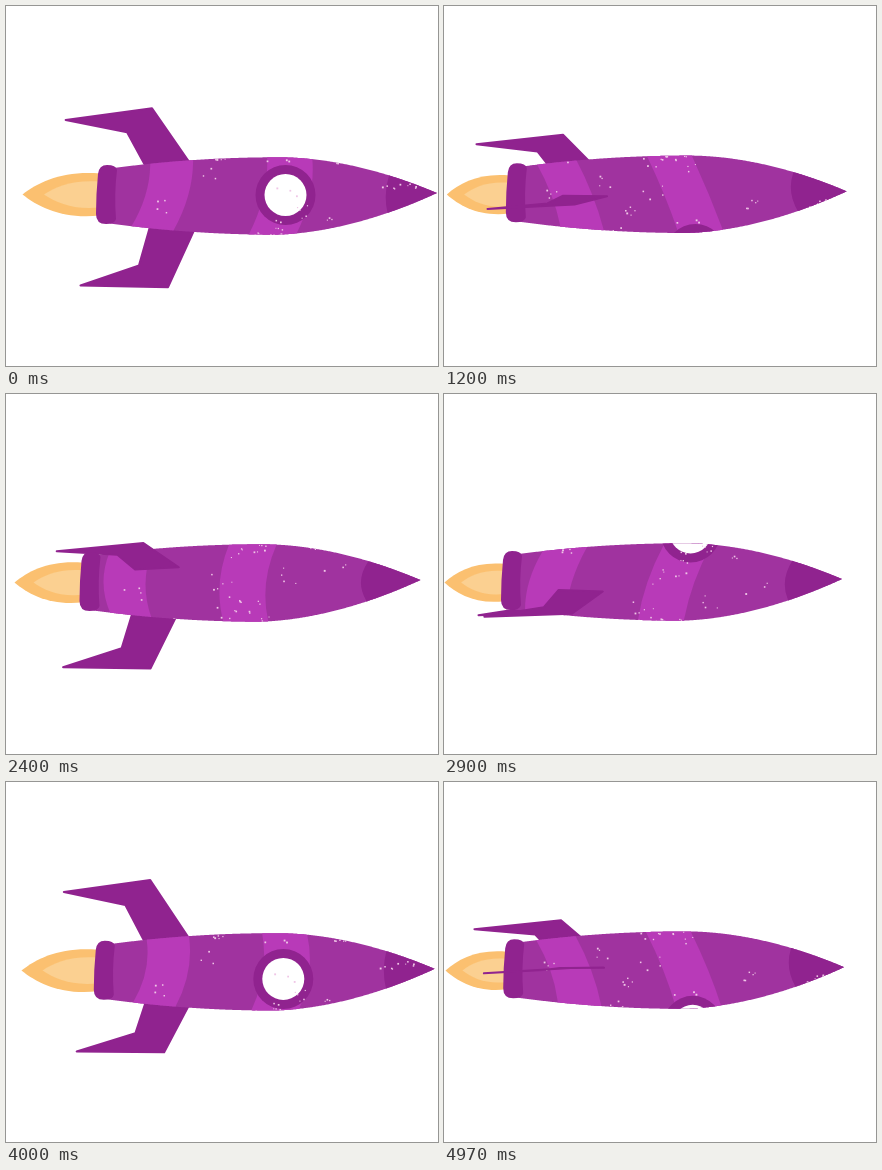
An HTML page with a canvas that plays this animation: 432x360 px, repeating every 5.07 s.

```html
<!DOCTYPE html>
<html lang="en">
<head>
<meta charset="utf-8">
<title>Rolling rocket</title>
<style>
  html, body { margin: 0; width: 100%; height: 100%; overflow: hidden; background: #fff; }
  canvas { display: block; width: 432px; height: 360px; }
</style>
</head>
<body>
<canvas id="stage" width="432" height="360"></canvas>
<script>
const ctx = document.getElementById('stage').getContext('2d');
const LOOP = 5070;
const BODY = '#a0339f', LIGHT = '#b83ab8', DARK = '#90238f';
const TAIL = 104, BELLY = 270, NOSE = 431;
const rad = d => d * Math.PI / 180;
const sin = d => Math.sin(rad(d)), cos = d => Math.cos(rad(d));

// Hull profile: half height and axis height along x
const girth = x => x < BELLY
  ? 38.7 - 11.2 * ((BELLY - x) / (BELLY - TAIL)) ** 2
  : 38.7 * (1 - ((x - BELLY) / (NOSE - BELLY)) ** 1.84);
const axis = x => 190 - 3 * Math.max(0, (x - BELLY) / (NOSE - BELLY));

const hull = new Path2D();
for (let x = TAIL; x <= NOSE; x++) hull.lineTo(x, axis(x) - girth(x));
for (let x = NOSE; x >= TAIL; x--) hull.lineTo(x, axis(x) + girth(x));
hull.closePath();

const collar = new Path2D(
  'M92 168 Q93 159 101 159 Q110 159 111 164 Q108 188 110 213 ' +
  'Q109 218 100 218 Q90 218 90 208 Q90 188 92 168Z');
// Mouth at x = 0, tip at x = -74
const flame = new Path2D(
  'M-74 0 C-58 -13 -34 -24 2 -21 L2 21 C-34 25 -58 13 -74 0Z');

// Fin outline: x, axis height, distance from the axis
const FIN = [[68, 197, 87], [155, 192, 94], [188, 189, 33], [144, 189, 28], [128, 193, 70]];

let seed = 11;
const rnd = () => (seed = seed * 16807 % 2147483647) / 2147483647;

// Small clusters spread evenly around the hull
const specks = [];
for (let i = 0; i < 24; i++) {
  const x = 135 + 270 * rnd(), a = i * 137.5;
  for (let n = 2 + 3 * rnd(); n > 0; n--) {
    specks.push({
      x: x + (rnd() - .5) * 24,
      a: a + (rnd() - .5) * 30,
      size: 1 + rnd() * .9
    });
  }
}

function drawFin(a) {
  ctx.beginPath();
  for (const [x, y, r] of FIN) {
    const dy = -r * cos(a);
    ctx.lineTo(x + .09 * dy + 3 * sin(a), y + dy);
  }
  ctx.closePath();
  ctx.fillStyle = ctx.strokeStyle = DARK;
  ctx.lineWidth = 2;
  ctx.lineJoin = 'round';
  ctx.fill();
  ctx.stroke();
}

// Edge of a tilted ring that turns with the hull
function ringEdge(x, roll, swing, bow) {
  const u = roll + 46 + .11 * x;
  const h = girth(x), y = axis(x);
  const mean = x + 8.5 * swing * sin(u), tilt = .42 * h * swing * cos(u);
  return {
    top: [mean + tilt, y - h],
    mid: [mean + 13 * swing * sin(u) + bow, y],
    bottom: [mean - tilt, y + h]
  };
}

function drawBand(x1, x2, roll, color, swing = 1, bow = 0) {
  const l = ringEdge(x1, roll, swing, bow), r = ringEdge(x2, roll, swing, bow);
  ctx.beginPath();
  ctx.moveTo(l.top[0], 0);
  ctx.lineTo(...l.top);
  ctx.quadraticCurveTo(...l.mid, ...l.bottom);
  ctx.lineTo(l.bottom[0], 360);
  ctx.lineTo(r.bottom[0], 360);
  ctx.lineTo(...r.bottom);
  ctx.quadraticCurveTo(...r.mid, ...r.top);
  ctx.lineTo(r.top[0], 0);
  ctx.fillStyle = color;
  ctx.fill();
}

function drawFlame(k, y) {
  const layer = (sx, sy, color) => {
    ctx.save();
    ctx.translate(92, y);
    ctx.scale(k * sx, (.5 + .5 * k) * sy);
    ctx.fillStyle = color;
    ctx.fill(flame);
    ctx.restore();
  };
  layer(1.02, 1, '#fbc070');
  layer(.73, .62, '#fbd091');
}

function disc(x, y, r, color) {
  ctx.beginPath();
  ctx.arc(x, y, r, 0, 2 * Math.PI);
  ctx.fillStyle = color;
  ctx.fill();
}

function drawWindow(roll) {
  const turn = (roll + 557.5) % 360 - 180;
  const y = 189 + .54 * turn, off = Math.abs(turn);
  disc(279.5, y, 30, DARK);
  disc(279.5, y, 21, off > 25 && off < 80 ? '#e6d6ec' : '#fff');
}

function drawSpecks(roll) {
  ctx.fillStyle = '#efc6e6';
  for (const { x, a, size } of specks) {
    if (sin(a + roll) > 0) ctx.fillRect(x, axis(x) - girth(x) * cos(a + roll), size, size);
  }
}

function drawHull(roll) {
  ctx.save();
  ctx.clip(hull);
  ctx.fillStyle = BODY;
  ctx.fillRect(0, 0, 432, 360);
  drawBand(129, 171, roll, LIGHT);
  drawBand(245, 291, roll, LIGHT);
  drawBand(380, 450, roll, DARK, .3, -9);
  drawWindow(roll);
  drawSpecks(roll);
  ctx.restore();
}

function draw(step) {
  const roll = -17.5 + 7.5 * step;
  const back = 16.5 * (1 - cos(15 * step)), lift = .06 * back;
  const fins = [roll, roll - 144];

  ctx.clearRect(0, 0, 432, 360);
  ctx.save();
  ctx.translate(-back, -lift);
  fins.filter(a => sin(a) <= 0).forEach(drawFin);
  drawFlame(1 - .0068 * back, 188.5 + lift);
  drawHull(roll);
  ctx.fillStyle = DARK;
  ctx.fill(collar);
  fins.filter(a => sin(a) > 0).forEach(drawFin);
  ctx.restore();
}

// 12.5 poses a second, shown on a 30 Hz clock
function frame() {
  const tick = Math.floor((performance.now() % LOOP + 5) * .03);
  draw(Math.min(62, Math.floor(tick * 5 / 12)));
  requestAnimationFrame(frame);
}
frame();
</script>
</body>
</html>
```
